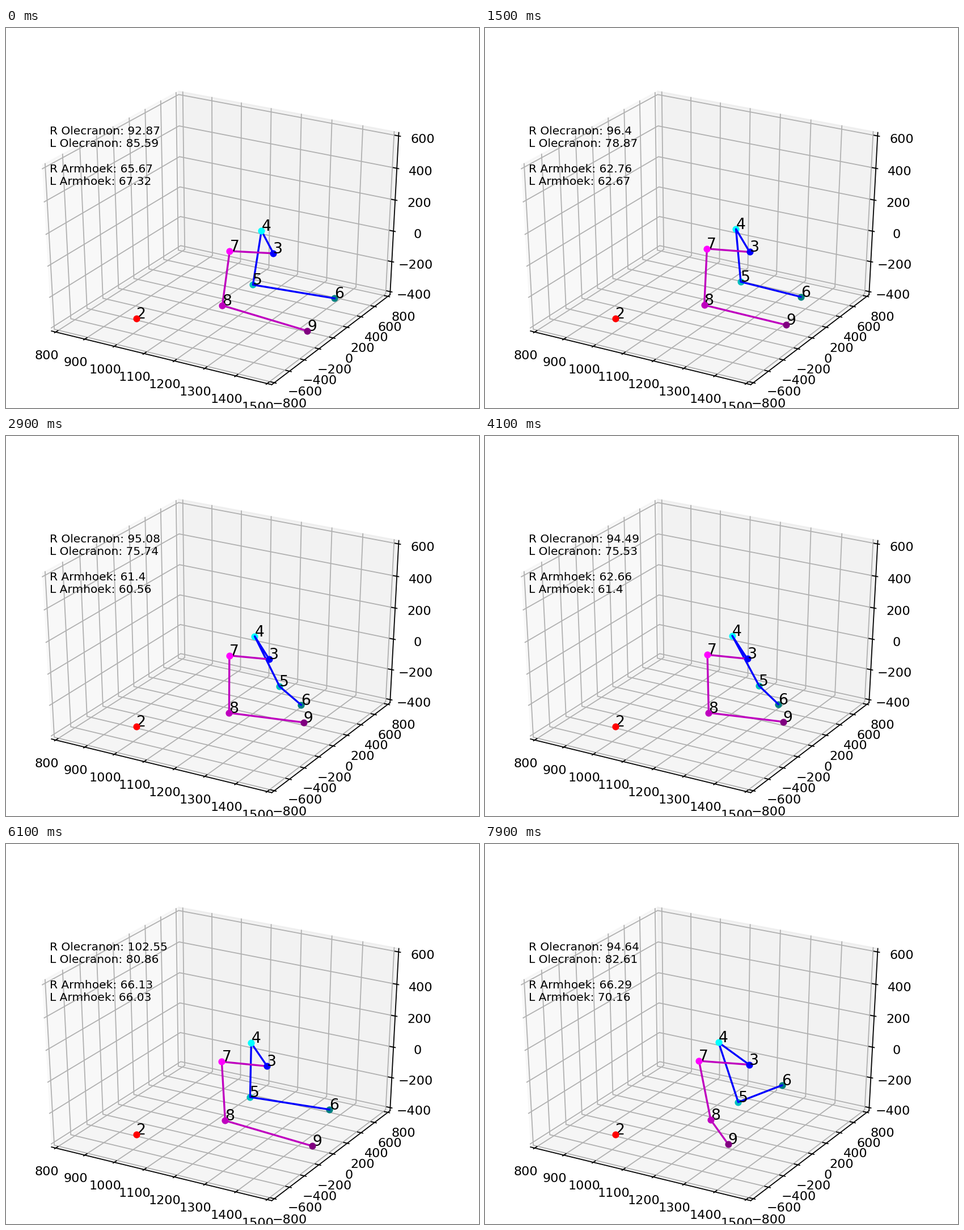
Animation, 834 px wide and 671 px high, one loop 8 s. Source, as a matplotlib script:

```python
import numpy as np
import matplotlib.pyplot as plt
from matplotlib.animation import FuncAnimation

W, H, DPI = 834, 671, 160
INTERVAL, FRAMES = 100, 80
EDGE = 0.5 + 1 / 48          # panes reach a little past the unit cube
GRID = "#b0b0b0"
PURPLE = (0.75, 0, 0.75)

# The picture refreshes about every 300 ms, faster in two short bursts.
REFRESH = np.array([0, 500, 600, 800, 1000, *range(1500, 2701, 300),
                    *range(2900, 4400, 300), *range(4400, 4900, 100),
                    *range(4900, 6701, 300), 6900, *range(7300, 8000, 300)])

# Each joint hangs from its parent; the offset is rest + bend + drift + swing.
ROOT, MARKER = (471.4, 397.9), (230.4, 512.9)
SKELETON = {
    3: (None, ROOT, (0, 0), (-11, -5.5), (7, -2)),
    4: (3, (-21, -40), (0, 0), (-7, -1), (-25, 2)),
    5: (4, (-15, 95.5), (52, -7), (13, 0), (35, 10)),
    6: (5, (144, 24), (-107, 10), (-4, -2), (-63, -52)),
    7: (3, (-77, -4), (9, 0), (-3, -4), (-8, 2)),
    8: (7, (-13, 96), (0, 0), (19, 8), (12, -1)),
    9: (8, (150, 45), (-22, -29), (4, 0), (-125, -2)),
}
COLORS = {2: "red", 3: "blue", 4: "cyan", 5: (0, 0.75, 0.75), 6: "teal",
          7: "magenta", 8: PURPLE, 9: "purple"}
LIMBS = [((3, 4, 5, 6), "blue"), ((3, 7, 8, 9), PURPLE)]

# Joint angles at a few moments, read out on separate baselines.
MOMENTS = [400, 1500, 2900, 4100, 4900, 6100, 7900]
ANGLES = {
    "R Olecranon": (187.8, [92.87, 96.4, 95.08, 94.49, 99.57, 102.55, 94.64]),
    "L Olecranon": (210.1, [85.59, 78.87, 75.74, 75.53, 76.82, 80.86, 82.61]),
    "R Armhoek": (254.7, [65.67, 62.76, 61.4, 62.66, 63.5, 66.13, 66.29]),
    "L Armhoek": (277, [67.32, 62.67, 60.56, 61.4, 62.51, 66.03, 70.16]),
}

plt.rcParams["font.family"] = "DejaVu Sans"
fig = plt.figure(figsize=(W / DPI, H / DPI), dpi=DPI, facecolor="white")
ax = fig.add_axes([0, 0, 1, 1])
ax.set(xlim=(0, W), ylim=(H, 0))
ax.axis("off")


def project(*points):
    """Perspective view of the centred cube, elevation 30, azimuth -60."""
    p = np.array(points, float)
    e, a = np.radians(30), np.radians(-60)
    right = np.array([-np.sin(a), np.cos(a), 0])
    up = np.array([-np.sin(e) * np.cos(a), -np.sin(e) * np.sin(a), np.cos(e)])
    view = np.array([np.cos(e) * np.cos(a), np.cos(e) * np.sin(a), np.sin(e)])
    depth = 10 - p @ view
    return np.column_stack([383.5 + 4303 * (p @ right) / depth,
                            361.5 - 3207 * (p @ up) / depth])


def path(points, color, z):
    ax.plot(*project(*points).T, color=color, lw=0.8, zorder=z)


def draw_axis(lo, hi, step, line, grid, tick_dir, label_shift):
    """line and grid map a position along the axis to cube points."""
    path([line(-EDGE), line(EDGE)], "black", 1.2)
    for value in range(lo, hi + 1, step):
        pos = (value - lo) / (hi - lo) - 0.5
        path(grid(pos), GRID, 1)
        base, out = np.array(line(pos)), np.array(tick_dir) / 120
        path([base - 2 * out, base + out], "black", 1.3)
        x, y = project(base)[0] + label_shift
        ax.text(x, y + 8.1, str(value).replace("-", "\u2212"), size=10,
                ha="center", va="baseline", zorder=1.4)


def draw_box():
    E = EDGE
    panes = [(0.95, [(-E, -E, -E), (-E, E, -E), (-E, E, E), (-E, -E, E)]),
             (0.90, [(-E, E, -E), (E, E, -E), (E, E, E), (-E, E, E)]),
             (0.925, [(-E, -E, -E), (E, -E, -E), (E, E, -E), (-E, E, -E)])]
    for shade, corners in panes:
        ax.add_patch(plt.Polygon(project(*corners), closed=False, lw=1,
                                 color=(shade,) * 3, alpha=0.5, zorder=0.5))
    draw_axis(800, 1500, 100, lambda s: (s, -E, -E),
              lambda s: [(s, -E, -E), (s, E, -E), (s, E, E)],
              (0, -1, 0), (-16.3, 40))
    draw_axis(-800, 800, 200, lambda s: (E, s, -E),
              lambda s: [(E, s, -E), (-E, s, -E), (-E, s, E)],
              (1, 0, 0), (27.3, 35.2))
    draw_axis(-400, 600, 200, lambda s: (E, E, s),
              lambda s: [(E, E, s), (-E, E, s), (-E, -E, s)],
              (1, 0, 0), (42.2, 4.2))


def ease(time, start, end):
    s = np.clip((time - start) / (end - start), 0, 1)
    return s * s * (3 - 2 * s)


def elbow_bend(time):
    return ease(time, 400, 3200) - ease(time, 4100, 6100)


def pose_at(time):
    drift = np.sqrt(max(time - 400, 0) / 5700)
    weights = np.array([1, elbow_bend(time), drift, ease(time, 6300, 8000)])
    pose = {2: np.array(MARKER)}
    for joint, (parent, *offsets) in SKELETON.items():
        pose[joint] = pose.get(parent, 0) + weights @ np.array(offsets)
    return pose


draw_box()
limbs = [ax.plot([], [], color=color, lw=1.5, zorder=2)[0] for _, color in LIMBS]
dots, tags = {}, {}
for n, color in COLORS.items():
    z = 1.8 if n in (4, 5, 6) else 2.5 if n == 3 else 4
    dots[n], = ax.plot([], [], "o", color=color, ms=4.47, mew=1, zorder=z)
    tags[n] = ax.text(0, 0, str(n), size=12, va="baseline", zorder=3)
readouts = {name: ax.text(77.2, y, "", size=9.04, va="baseline", zorder=3)
            for name, (y, _) in ANGLES.items()}


def update(frame):
    time = REFRESH[REFRESH <= frame * INTERVAL][-1]
    pose = pose_at(time)
    for n, (x, y) in pose.items():
        dots[n].set_data([x], [y])
        tags[n].set_position((x, y))
    # The far shoulder lies in front of its limb while the arm is extended.
    dots[4].set_zorder(2.5 if elbow_bend(time) < 0.2 else 1.8)
    for line, (chain, _) in zip(limbs, LIMBS):
        line.set_data(*np.array([pose[n] for n in chain]).T)
    for name, (_, values) in ANGLES.items():
        angle = float(np.interp(time, MOMENTS, values))
        readouts[name].set_text(f"{name}: {round(angle, 2)}")
    return [*limbs, *dots.values(), *tags.values(), *readouts.values()]


anim = FuncAnimation(fig, update, frames=FRAMES, interval=INTERVAL,
                     repeat=True, repeat_delay=0, blit=False)
plt.show()
```
